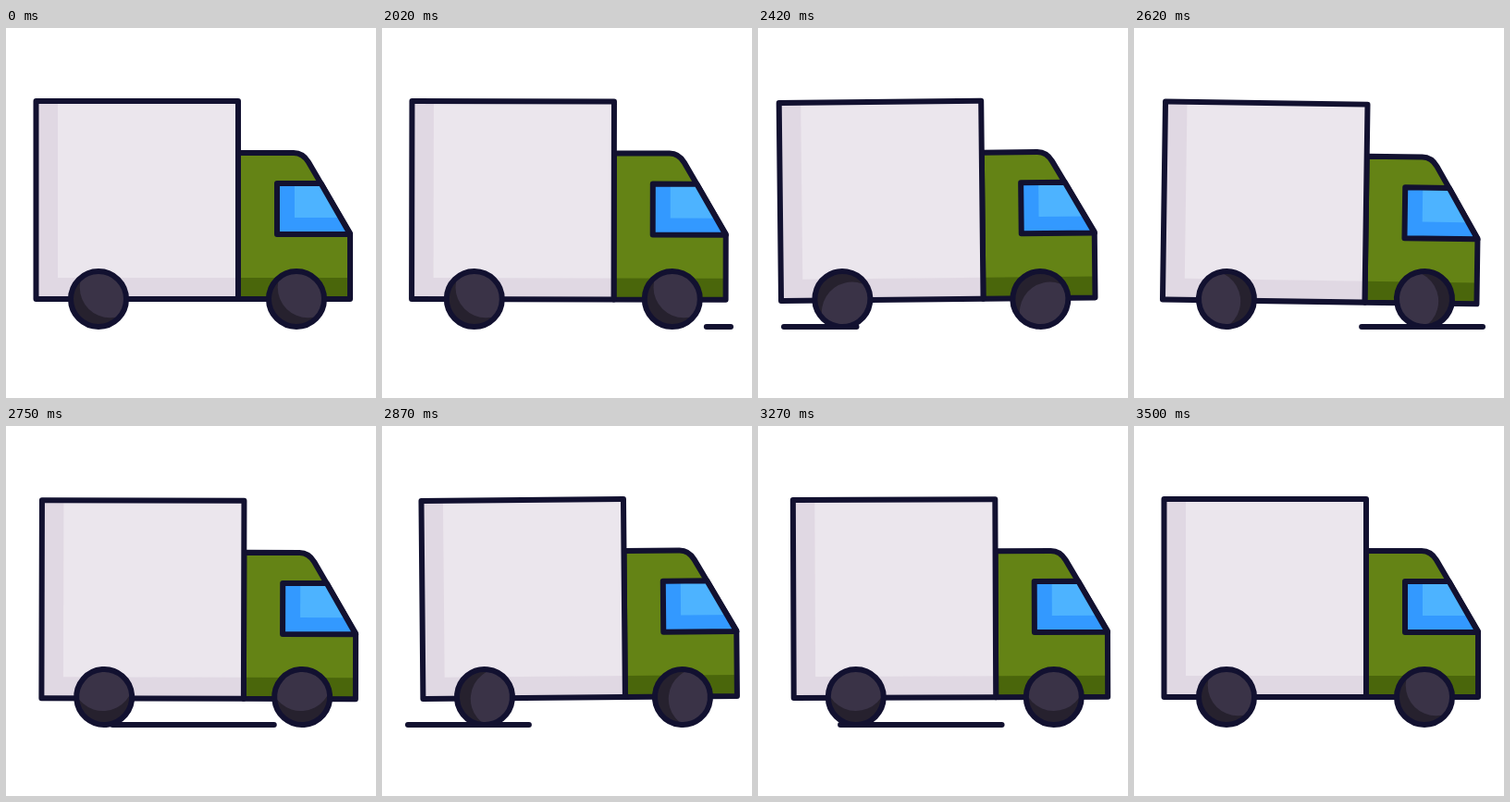
These frames come from a looping animation (400x400 px, 3.52 s). An HTML page with a canvas:

```html
<!DOCTYPE html>
<html lang="en">
<head>
<meta charset="utf-8">
<title>Delivery truck</title>
<style>
  html, body { margin: 0; width: 100%; height: 100%; overflow: hidden; background: #fff; }
  canvas { display: block; width: 400px; height: 400px; }
</style>
</head>
<body>
<canvas id="stage" width="400" height="400"></canvas>
<script>
const ctx = document.getElementById('stage').getContext('2d');

const LOOP = 3520, DRIVE_START = 2020, DRIVE_LENGTH = 1500;
const INK = '#121130';
const BEAT = DRIVE_LENGTH / 7;

// Keys are [time, value] pairs.
const SHIFT = [[0, 0], [275, -11], [1015, 13], [1500, 0]];
const TILT = [[0, 0], [BEAT, 0.95], [2 * BEAT, -0.65], [3 * BEAT, 0.95],
  [4 * BEAT, -0.65], [5 * BEAT, 0.95], [6 * BEAT, -0.3], [1500, 0]];
const SINK = [[0, 0], [BEAT, 3.2], [2 * BEAT, 0.2], [3 * BEAT, 3.2],
  [4 * BEAT, 0.2], [5 * BEAT, 3.2], [6 * BEAT, 0.2], [1500, 0]];

const clamp = v => Math.min(1, Math.max(0, v));
const linear = u => u;
const smooth = u => (1 - Math.cos(Math.PI * u)) / 2;

function valueAt(keys, time, ease) {
  for (let i = 1; i < keys.length; i++) {
    const [t0, v0] = keys[i - 1], [t1, v1] = keys[i];
    if (time <= t1) return v0 + (v1 - v0) * ease((time - t0) / (t1 - t0));
  }
  return keys[keys.length - 1][1];
}

// Cubic bezier ease with handles (0.46, 0) and (0.65, 1).
function spinEase(x) {
  let low = 0, high = 1;
  for (let i = 0; i < 24; i++) {
    const s = (low + high) / 2, r = 1 - s;
    if (3 * r * r * s * 0.46 + 3 * r * s * s * 0.65 + s * s * s < x) low = s;
    else high = s;
  }
  return low * low * (3 - 2 * low);
}

// The drive advances in 25 ms steps, shown alternately for 30 and 20 ms.
function driveTime(ms) {
  const since = ms % LOOP - DRIVE_START;
  if (since < 0) return 0;
  const pair = Math.floor(since / 50);
  const step = 2 * pair + (since - pair * 50 >= 30 ? 1 : 0);
  return Math.min(DRIVE_LENGTH, 25 * (step + 1));
}

function rect(color, x, y, w, h) {
  ctx.fillStyle = color;
  ctx.fillRect(x, y, w, h);
}

function outlined(path, paint) {
  ctx.save();
  ctx.clip(path);
  paint();
  ctx.restore();
  ctx.stroke(path);
}

const box = new Path2D('M32.5 79H251V293H32.5Z');
const cab = new Path2D('M251 135H311Q321 135 327 145L372 222V293H251Z');
const pane = new Path2D('M293 168H340.5L372 223H293Z');
const tyre = new Path2D();
tyre.arc(0, 0, 30, 0, 2 * Math.PI);

function drawBody() {
  outlined(cab, () => {
    rect('#648315', 250, 130, 130, 170);
    rect('#4a660b', 250, 270, 130, 30);
  });
  outlined(pane, () => {
    rect('#3399ff', 290, 165, 90, 60);
    rect('#4db3ff', 312, 165, 70, 40);
  });
  outlined(box, () => {
    rect('#e0d8e3', 30, 75, 225, 220);
    rect('#ebe6ed', 56, 75, 200, 195);
  });
}

function drawWheel(x, angle) {
  ctx.save();
  ctx.translate(x, 293);
  ctx.rotate(angle);
  outlined(tyre, () => {
    rect('#26212e', -31, -31, 62, 62);
    ctx.fillStyle = '#3a3347';
    ctx.beginPath();
    ctx.arc(12.7, -12.7, 33, 0, 2 * Math.PI);
    ctx.fill();
  });
  ctx.restore();
}

// A dash that sweeps along the ground from right to left.
function drawGroundLine(time) {
  const phase = time % 500;
  const head = clamp(phase * 3 / 1000), tail = clamp((phase - 500 / 3) * 3 / 1000);
  if (head <= tail) return;
  ctx.beginPath();
  ctx.moveTo(377 - 349 * tail, 323);
  ctx.lineTo(377 - 349 * head, 323);
  ctx.stroke();
}

function draw(ms) {
  const time = driveTime(ms);
  rect('#fff', 0, 0, 400, 400);
  ctx.strokeStyle = INK;
  ctx.lineWidth = 6;
  ctx.lineJoin = ctx.lineCap = 'round';

  drawGroundLine(time);

  ctx.save();
  ctx.translate(valueAt(SHIFT, time, smooth), 0);
  ctx.save();
  ctx.translate(202, 186 + valueAt(SINK, time, linear));
  ctx.rotate(valueAt(TILT, time, linear) * Math.PI / 180);
  ctx.translate(-202, -186);
  drawBody();
  ctx.restore();
  const angle = 4 * Math.PI * spinEase(time / DRIVE_LENGTH);
  drawWheel(100, angle);
  drawWheel(314, angle);
  ctx.restore();
}

const start = performance.now();
function tick() {
  draw(performance.now() - start);
  requestAnimationFrame(tick);
}
tick();
</script>
</body>
</html>
```
